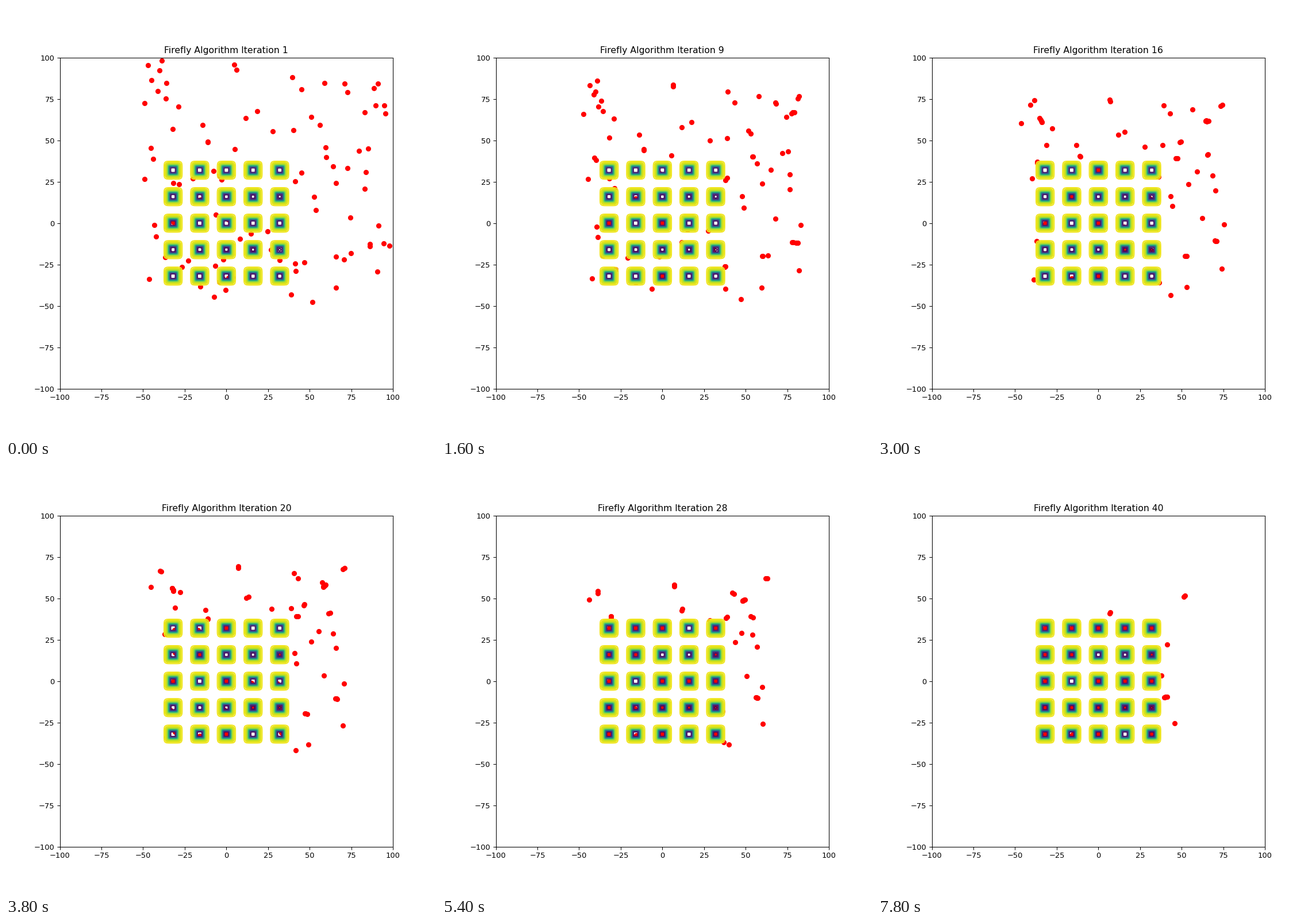
Recreate the animation shown at these times as a matplotlib script. Size 748x748 px, loop 8 s.

```python
import numpy as np
import matplotlib.pyplot as plt
from matplotlib.animation import FuncAnimation

COUNT, STEPS = 100, 40
ALPHA, BETA, GAMMA = 0.1, 1.0, 0.5
LOW, HIGH = -50, 100

WELLS = np.array([-32.0, -16.0, 0.0, 16.0, 32.0])
RANK = np.arange(1, 26).reshape(5, 5)


def sixth(v):
    sq = v * v
    return sq * sq * sq


def foxholes(x, y):
    """Shekel's foxholes at a single point."""
    dist = RANK + sixth(y - WELLS)[:, None] + sixth(x - WELLS)
    return 1 / (0.002 + (1 / dist).sum())


def foxholes_grid(x, y):
    total = np.full(x.shape, 0.002)
    for (row, col), rank in np.ndenumerate(RANK):
        total += 1 / (rank + sixth(x - WELLS[col]) + sixth(y - WELLS[row]))
    return 1 / total


def simulate():
    """Positions at every iteration; a move is kept only if it improves."""
    np.random.seed(42)
    pos = np.random.uniform(LOW, HIGH, (COUNT, 2))
    pts = pos.tolist()
    cost = [foxholes(x, y) for x, y in pts]
    history = [pos]
    for _ in range(STEPS - 1):
        for i in range(COUNT):
            x, y = pts[i]
            for j in range(COUNT):
                if cost[j] >= cost[i]:
                    continue
                dx, dy = pts[j][0] - x, pts[j][1] - y
                pull = BETA * np.exp(-GAMMA * np.hypot(dx, dy))
                u, v = np.random.rand(2).tolist()
                nx = x + pull * dx + ALPHA * (u - 0.5)
                ny = y + pull * dy + ALPHA * (v - 0.5)
                value = foxholes(nx, ny)
                if value < cost[i]:
                    x, y, cost[i] = nx, ny, value
            pts[i] = [x, y]
        history.append(np.array(pts))
    return history


history = simulate()

fig, ax = plt.subplots(figsize=(8, 8), dpi=93.5)
axis = np.linspace(-100, 100, 400)
gx, gy = np.meshgrid(axis, axis)
ax.contour(gx, gy, foxholes_grid(gx, gy), levels=50, cmap="viridis")
flies = ax.scatter(*history[0].T, color="red")
ax.set_xlim(-100, 100)
ax.set_ylim(-100, 100)
title = ax.set_title("Firefly Algorithm Iteration 1")


def update(step):
    flies.set_offsets(history[step])
    title.set_text(f"Firefly Algorithm Iteration {step + 1}")
    return flies, title


anim = FuncAnimation(fig, update, frames=STEPS, interval=200,
                     repeat=True, repeat_delay=0)
plt.show()
```
